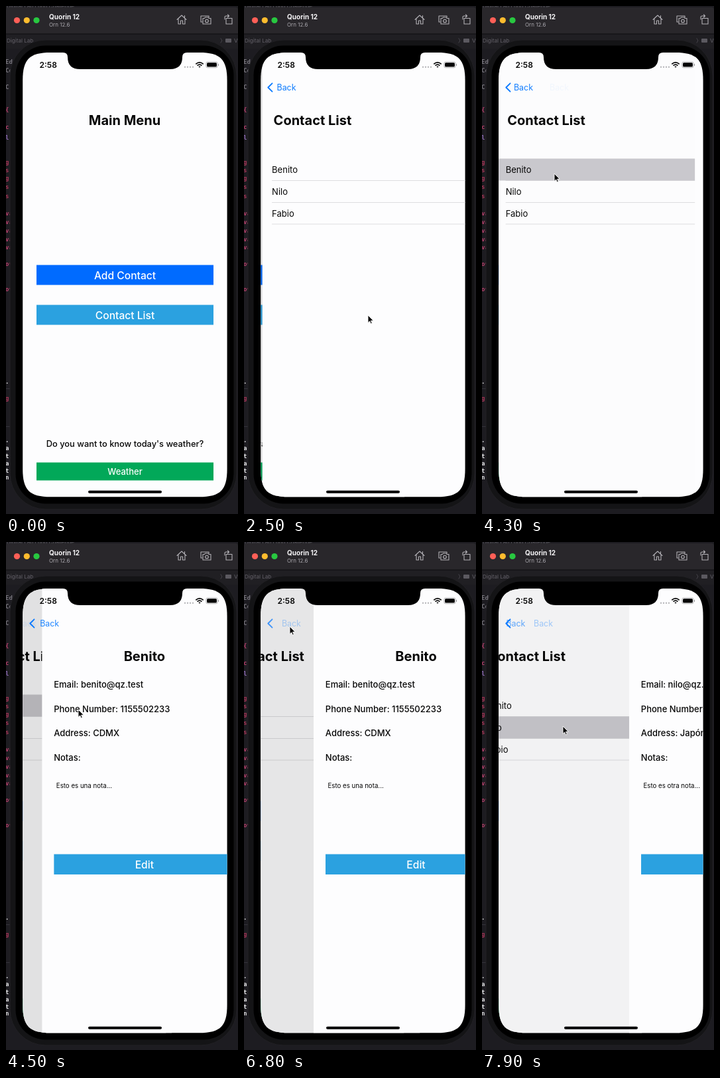
These frames come from a looping animation (350x764 px, 8 s). An HTML page:

```html
<!DOCTYPE html>
<html lang="en">
<head>
<meta charset="utf-8">
<title>Contacts app</title>
<style>
  html, body { margin: 0; width: 100%; height: 100%; overflow: hidden; background: #1d1c21; }
  svg { display: block; width: 350px; height: 764px; }
  text { font-family: Inter, Roboto, sans-serif; font-size: 13px; font-weight: 500; fill: #060606; white-space: pre; }
  .title { font-size: 20px; font-weight: 700; }
  .mid { text-anchor: middle; }
  .btn { font-size: 15.6px; fill: #fff; }
  .row { font-weight: 400; }
  .note { font-size: 9.7px; font-weight: 400; }
  .nav { font-size: 12.4px; font-weight: 400; fill: #0a7aff; }
  .code { font: 600 9px "DejaVu Sans Mono", monospace; }
  .dim { font-size: 8px; fill: #5b5960; }
  .line { stroke: #dedee0; }
  .icon { fill: none; stroke: #b3b1b6; stroke-width: 1.1; stroke-linejoin: round; stroke-linecap: round; }
</style>
</head>
<body>
<svg viewBox="0 0 350 764">
  <defs>
    <clipPath id="screen">
      <path d="M25.200 112C25.200 80.200 35.400 70 67.200 70H291.600C323.400 70 333.600 80.200 333.600 112V696.300C333.600 728.100 323.400 738.300 291.600 738.300H67.200C35.400 738.300 25.200 728.100 25.200 696.300Z"/>
    </clipPath>
  </defs>

  <!-- editor behind the simulator -->
  <rect width="350" height="764" fill="#1d1c21"/>
  <text class="dim" x="1" y="3" fill="#777">Digital Lab Long Challenge</text>
  <rect y="42" width="350" height="22" fill="#201f23"/>
  <text class="dim" x="1" y="55">Digital Lab</text>
  <text class="dim" x="323" y="55">〉</text>
  <rect x="331" y="49" width="9" height="6" rx="1" fill="#5b5960"/>
  <text class="dim" x="344" y="55">V</text>
  <path d="M0 632.500H14M0 575.500H14" stroke="#34333a"/>
  <g id="code"></g>

  <!-- window bar -->
  <path d="M0 42V6Q0 2 4 2H346Q350 2 350 6V42Z" fill="#29272b"/>
  <path d="M0 42H350" stroke="#0c0c0e"/>
  <circle cx="16.500" cy="21.500" r="4.600" fill="#ff5f57"/>
  <circle cx="31.300" cy="21.500" r="4.600" fill="#febc2e"/>
  <circle cx="46" cy="21.500" r="4.600" fill="#28c840"/>
  <text x="65" y="20" style="font-size:10px;font-weight:700;fill:#f4f3f5">Quorin 12</text>
  <text x="65" y="30.500" style="font-size:8px;font-weight:400;fill:#a9a7ad">Orn 12.6</text>
  <g class="icon">
    <path d="M258 20.500L265 14L272 20.500M260 19.500V27H263.500V22H266.500V27H270V19.500M269.500 17V14.500"/>
    <path d="M296 24H294V15H306V17"/>
    <path d="M297 18.500H299.500L300.500 17H305L306 18.500H309V27H297Z"/>
    <circle cx="303" cy="22.500" r="2.300"/>
    <path d="M332 18.500H341V27H332ZM330 20V17Q330 15 332 15H336M334.500 13L336.500 15L334.500 17"/>
  </g>

  <!-- device -->
  <rect x="6" y="51" width="342" height="706" rx="54" fill="#141416" stroke="#222125"/>
  <rect x="14.500" y="59.500" width="329" height="689" rx="45" fill="#000"/>

  <g clip-path="url(#screen)">
    <g id="menu">
      <rect x="25" y="70" width="309" height="669" fill="#fdfdfe"/>
      <text class="title mid" x="179" y="179">Main Menu</text>
      <rect x="46" y="389.500" width="267" height="30" fill="#006bff"/>
      <text class="btn mid" x="179.500" y="410.500">Add Contact</text>
      <rect x="46" y="449.500" width="267" height="30" fill="#2ba1e0"/>
      <text class="btn mid" id="open" x="179.500" y="470.500">Contact List</text>
      <text class="mid" x="179.500" y="662.500" style="font-size:12.85px">Do you want to know today's weather?</text>
      <rect x="46" y="686.500" width="267" height="27" fill="#02a859"/>
      <text class="mid" x="179.500" y="704.700" style="fill:#fff">Weather</text>
    </g>
    <rect id="shade1" x="25" y="70" width="309" height="669"/>

    <g id="list">
      <rect x="25" y="70" width="309" height="669" fill="#fdfdfe"/>
      <text class="title" x="42" y="179">Contact List</text>
      <path class="line" d="M39.500 262.500H334M39.500 295.500H334M39.500 328H334"/>
      <rect id="mark" x="25" width="309" height="33" fill="#cac9ce"/>
      <text class="row" x="39.500" y="250.700">Benito</text>
      <text class="row" x="39.500" y="283.700">Nilo</text>
      <text class="row" x="39.500" y="316.700">Fabio</text>
    </g>
    <rect id="shade2" x="25" y="70" width="309" height="669"/>

    <g id="detail">
      <rect x="25" y="70" width="309" height="669" fill="#fdfdfe"/>
      <text class="title mid" id="name" x="179.500" y="179"></text>
      <text id="email" x="42.800" y="218.500"></text>
      <text id="phone" x="42.800" y="255.500"></text>
      <text id="place" x="42.800" y="292.300"></text>
      <text x="42.800" y="329.300">Notas:</text>
      <text class="note" id="note" x="46.500" y="369.500"></text>
      <rect x="43" y="469.500" width="273" height="30.500" fill="#2ba1e0"/>
      <text class="btn mid" x="179.500" y="490.500">Edit</text>
    </g>

    <path id="chevron" d="M42.500 116.300L36.300 122.500L42.500 128.700" fill="none" stroke="#0a7aff" stroke-width="1.900" stroke-linecap="round" stroke-linejoin="round"/>
    <text class="nav" id="back1" x="49.500" y="127">Back</text>
    <text class="nav" id="back2" x="49.500" y="127">Back</text>

    <!-- status bar -->
    <text x="50.500" y="93.300" style="font-size:12px;font-weight:600">2:58</text>
    <path d="M270 91.800H283" stroke="#b9b9bc" stroke-width="2.400" stroke-linecap="round" stroke-dasharray="0 4"/>
    <g fill="none" stroke="#050505" stroke-width="1.700">
      <path d="M286.300 87.300Q292 82.300 297.700 87.300M288.500 89.700Q292 86.700 295.500 89.700"/>
      <path d="M290.300 91L292 92.800L293.700 91Q292 89.800 290.300 91Z" fill="#050505" stroke="none"/>
    </g>
    <rect x="301.700" y="84" width="17.500" height="8.800" rx="2.600" fill="none" stroke="#a8a8aa" stroke-width=".8"/>
    <rect x="303" y="85.300" width="14.900" height="6.200" rx="1.500" fill="#050505"/>
    <path d="M320.500 87V90" stroke="#a8a8aa" stroke-width="1.200"/>
    <path d="M86 69V70Q93 70 93 77Q93 95 112 95H247Q266 95 266 77Q266 70 273 70V69Z"/>
    <rect x="124" y="728.700" width="111" height="4" rx="2"/>
  </g>

  <path id="cursor" d="M0 0V11.500L2.700 9L4.400 13L6.300 12.200L4.600 8.300H8.200Z" fill="#050505" stroke="#fff" stroke-width=".9" stroke-linejoin="round"/>
</svg>

<script>
const LOOP = 8000, STEP = 100, WIDTH = 309, SLIDE = 500;
const $ = id => document.getElementById(id);
const clamp = x => Math.min(1, Math.max(0, x));

const people = [
  { name: 'Benito', email: 'Email: benito@qz.test', phone: 'Phone Number: 1155502233',
    place: 'Address: CDMX', note: 'Esto es una nota...' },
  { name: 'Nilo', email: 'Email: nilo@qz.test', phone: 'Phone Number: 1155504411',
    place: 'Address: Japón', note: 'Esto es otra nota...' }
];

// time, x, y of the pointer tip
const path = [
  [500, 324, 690], [1000, 212, 506], [1300, 187, 465], [2700, 187, 465],
  [3600, 109, 252], [5000, 109, 252], [5600, 69, 127], [6900, 69, 127], [7500, 122, 277]
];

// clipped code at the left edge: baseline, text, colour
const code = [
  [87, 'Ed', '#77757c'], [100, 'Co', '#77757c'], [125, 'C:', '#77757c'],
  [159, '{', '#b8406c'], [185, 'c', '#b8406c'], [201, 'l', '#8d6bb5'],
  ...[238, 250, 262, 275, 289].map((y, i) => [y, 'gsgss'[i], '#a53556']),
  ...[315, 328, 341, 354, 366].map(y => [y, 'va', '#b8406c']),
  [391, 'ov', '#b8406c'], [429, 'ov', '#b8406c'], [568, '.', '#ddd'], [593, 'g', '#a53556'],
  ...[656, 668, 680, 691, 702, 712].map((y, i) => [y, '.atatn'[i], '#e6e6e8'])
];
$('code').innerHTML = code.map(([y, s, c]) =>
  `<text class="code" x="-1" y="${y}" style="fill:${c}">${s}</text>`).join('');

// cubic-bezier(.36, .66, .04, 1)
function ease(x) {
  if (x <= 0 || x >= 1) return clamp(x);
  const bez = (s, a, b) => 3 * s * (1 - s) ** 2 * a + 3 * s * s * (1 - s) * b + s ** 3;
  let lo = 0, hi = 1;
  for (let i = 0; i < 24; i++) {
    const m = (lo + hi) / 2;
    if (bez(m, .36, .04) < x) lo = m; else hi = m;
  }
  return bez(lo, .66, 1);
}
const slide = (t, start) => ease((t - start) / SLIDE);

function pointer(t) {
  const i = path.findIndex(p => p[0] > t);
  if (i < 0) return path[path.length - 1].slice(1);
  const [t0, x0, y0] = path[i - 1], [t1, x1, y1] = path[i];
  const k = (t - t0) / (t1 - t0), s = k * k * (3 - 2 * k);
  return [x0 + (x1 - x0) * s, y0 + (y1 - y0) * s];
}

const move = (id, x, y = 0) => $(id).setAttribute('transform', `translate(${x.toFixed(2)} ${y.toFixed(2)})`);
const fade = (id, a) => $(id).setAttribute('opacity', clamp(a).toFixed(3));
const enter = p => 56 * (1 - p) ** 1.5;

function draw(t) {
  const a = slide(t, 2116);
  const popping = t >= 6700 && t < 7300;
  const b = t < 6700 ? slide(t, 4289) : t < 7600 ? 1 - slide(t, 6741.6) : slide(t, 7824.2);

  move('menu', -.3 * WIDTH * a);
  move('list', WIDTH * (1 - a) - .3 * WIDTH * b);
  move('detail', WIDTH * (1 - b));
  fade('shade1', a < 1 ? .12 * a : 0);
  fade('shade2', .12 * b);

  const pressed = t >= 1900 && t < 2300;
  fade('open', pressed ? (t < 2000 ? .8 : .6) : 1);

  const first = t >= 4300 && t < 5000, second = t >= 7700;
  fade('mark', first || second ? 1 : 0);
  $('mark').setAttribute('y', second ? 262.5 : 229.5);

  const power = popping ? 4 : 1;
  fade('chevron', a * (t >= 6700 && t < 7000 ? .75 : 1));
  fade('back1', a * (1 - b) ** power);
  move('back1', enter(a) - 36 * b);
  fade('back2', b ** power);
  move('back2', enter(b));

  const who = people[t >= 7600 ? 1 : 0];
  for (const key in who) $(key).textContent = who[key];

  fade('cursor', t >= 500 ? 1 : 0);
  if (t >= 500) move('cursor', ...pointer(t));
}

const begin = performance.now();
function tick() {
  const t = (performance.now() - begin) % LOOP;
  draw(Math.floor(t / STEP) * STEP);
  requestAnimationFrame(tick);
}
tick();
</script>
</body>
</html>
```
